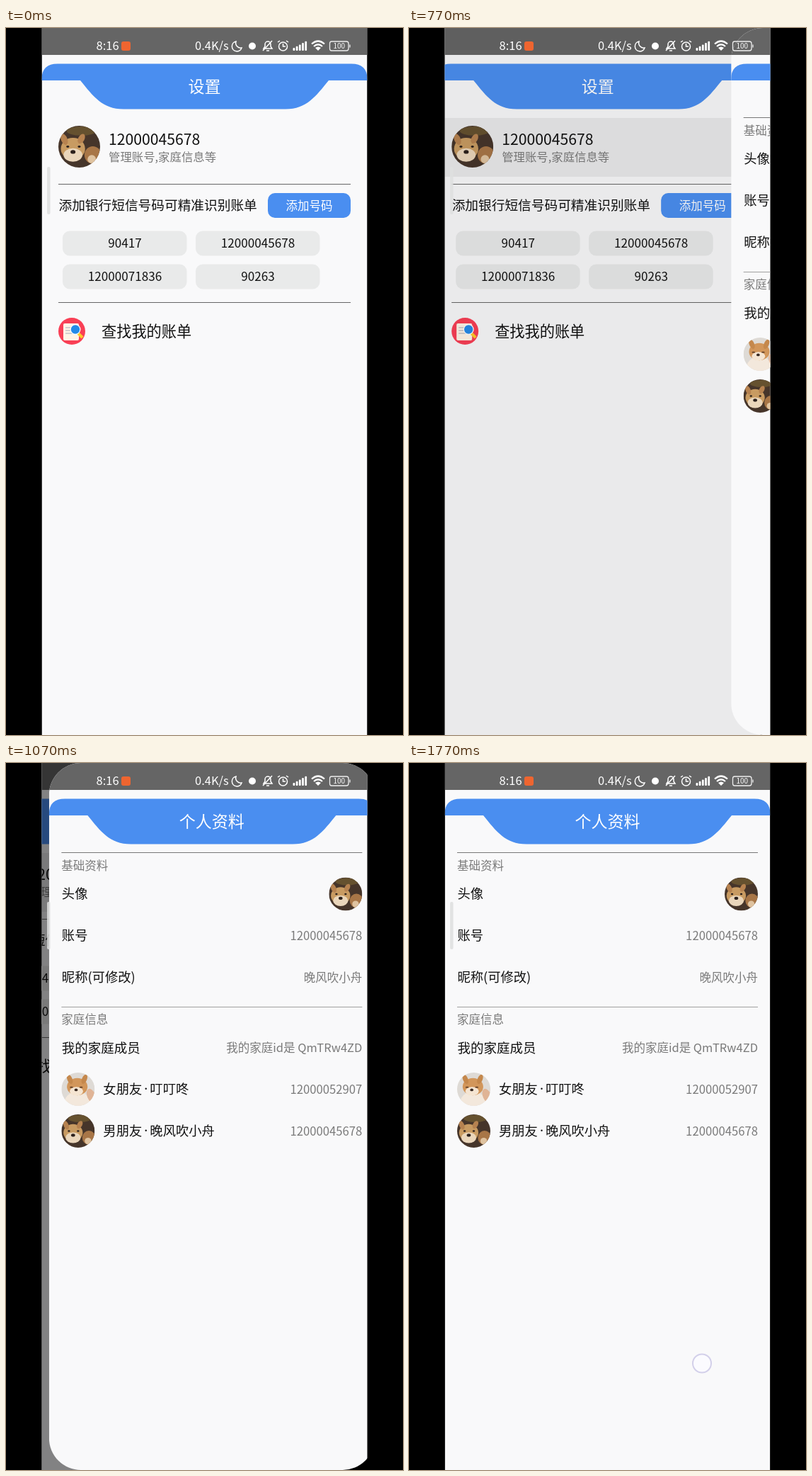
Animation, 561 px wide and 998 px high, one loop 1810 ms. Source, as an HTML page with a canvas:

```html
<!DOCTYPE html>
<html lang="zh-CN">
<head>
<meta charset="utf-8">
<style>
html, body { margin: 0; width: 100%; height: 100%; overflow: hidden; background: #000; }
canvas { display: block; }
</style>
</head>
<body>
<canvas id="stage" width="561" height="998"></canvas>
<script>
const c = document.getElementById('stage').getContext('2d');
const LOOP = 1810, LEFT = 50.5, WIDTH = 460, HEIGHT = 998;
const OPEN = 736, SETTLED = 1270, SPEED = 0.017;
const FONT = '"Noto Sans CJK SC", "Noto Sans CJK", "Noto Sans", sans-serif';
const BLUE = '#4a8ef0', PAPER = '#f9f9fa', GREY = '#7a7a7a';
const ACCOUNT = '12000045678', NICK = '晚风吹小舟';

const clamp = v => Math.max(0, Math.min(1, v));

function text(str, x, y, size, color = '#111', align = 'left', weight = 400) {
  c.font = `${weight} ${size}px ${FONT}`;
  c.fillStyle = color;
  c.textAlign = align;
  c.fillText(str, x, y + size * 0.37);
}

function box(x, y, w, h, r, color) {
  c.fillStyle = color;
  c.beginPath();
  c.roundRect(x, y, w, h, r);
  c.fill();
}

function oval(x, y, rx, ry, color, turn = 0) {
  c.fillStyle = color;
  c.beginPath();
  c.ellipse(x, y, rx, ry, turn, 0, 7);
  c.fill();
}

function stroke(d, color = '#fff', width = 1.5) {
  c.strokeStyle = color;
  c.lineWidth = width;
  c.stroke(new Path2D(d));
}

const rule = (x1, x2, y, color) => stroke(`M${x1} ${y}H${x2}`, color, 1);

function layer(draw) {
  c.save();
  draw();
  c.restore();
}

function avatar(x, y, r, bright) {
  layer(() => {
    c.translate(x, y);
    c.scale(r, r);
    c.beginPath();
    c.arc(0, 0, 1, 0, 7);
    c.clip();
    c.fillStyle = bright ? '#dedad5' : '#46352a';
    c.fillRect(-1, -1, 2, 2);
    if (bright) {
      oval(-0.05, 0.75, 0.75, 0.6, '#f3e8dc');
      oval(-0.05, -0.15, 0.62, 0.52, '#d2965a');
      oval(-0.5, -0.6, 0.15, 0.3, '#c5884c', -0.4);
      oval(0.38, -0.6, 0.15, 0.3, '#c5884c', 0.4);
      oval(-0.1, 0.12, 0.4, 0.26, '#f5e5d2');
      oval(-0.12, 0.04, 0.1, 0.08, '#3a2a22');
      oval(-0.4, -0.12, 0.1, 0.04, '#5b3a25');
      oval(0.18, -0.12, 0.1, 0.04, '#5b3a25');
      oval(0.8, 0.4, 0.25, 0.45, '#e0b496', -0.4);
    } else {
      oval(0.1, -0.75, 0.7, 0.22, '#65512f');
      oval(0.65, 0.4, 0.4, 0.42, '#a87647');
      oval(0.6, 0.6, 0.2, 0.2, '#dfc3a0');
      oval(-0.3, 0.1, 0.58, 0.52, '#c89b62');
      oval(-0.72, -0.35, 0.15, 0.28, '#b68250', -0.4);
      oval(0.1, -0.38, 0.15, 0.25, '#b68250', 0.5);
      oval(-0.3, 0.4, 0.45, 0.32, '#ead6bb');
      oval(-0.3, 0.25, 0.12, 0.09, '#2b201c');
      oval(-0.55, 0, 0.07, 0.05, '#2b201c');
      oval(0, 0, 0.07, 0.05, '#2b201c');
    }
  });
}

function pageBase(title) {
  c.fillStyle = PAPER;
  c.fillRect(LEFT, 0, WIDTH, HEIGHT);
  c.fillStyle = '#656565';
  c.fillRect(LEFT, 0, WIDTH, 38);
  c.fillStyle = BLUE;
  c.fill(new Path2D('M50.5 74V72Q50.5 50.5 73 50.5H488Q510.5 50.5 510.5 72V74H456C438 96 425 114.5 395 114.5H166C136 114.5 123 96 105 74Z'));
  text(title, 280.5, 82.5, 23, '#fff', 'center');
}

function settings(pressed) {
  pageBase('设置');
  if (pressed) box(LEFT, 127, WIDTH, 83, 0, 'rgba(0,0,0,.06)');
  avatar(103.5, 167.5, 29.5);
  text(ACCOUNT, 145, 157, 21.2);
  text('管理账号,家庭信息等', 145, 182, 16.4, GREY);
  rule(74, 487, 220.5, '#666');
  text('添加银行短信号码可精准识别账单', 74.5, 250.5, 18.7);
  box(370, 233, 117, 35, 10, BLUE);
  text('添加号码', 428.5, 250.5, 16.5, '#fff', 'center');
  ['90417', ACCOUNT, '12000071836', '90263'].forEach((number, i) => {
    const x = 80 + i % 2 * 188, y = 286.5 + (i >> 1) * 47;
    box(x, y, 175.5, 35, 10, '#e9eaea');
    text(number, x + 88, y + 17.5, 17.1, '#111', 'center');
  });
  rule(74, 487, 387.5, '#666');
  searchIcon();
  text('查找我的账单', 135, 428, 21.2);
}

function searchIcon() {
  oval(93, 428, 19, 19, '#f93f55');
  box(81, 417, 22, 24, 2, '#fff4e6');
  stroke('M84 423H92M84 427H92M84 431H95', '#a5a9b8', 1.2);
  stroke('M102 431L108 437', '#ffc928', 4);
  oval(98, 425.5, 7.5, 7.5, '#fff');
  oval(98, 425.5, 6.2, 6.2, '#258ae8');
}

function member(y, role, name, number, bright) {
  avatar(91.5, y, 23.5, bright);
  text(role, 127, y, 18.3);
  text('·', 187.5, y, 12, '#111', 'center');
  text(name, 193, y, 18.3);
  text(number, 493, y, 16.7, GREY, 'right');
}

function profile(toast) {
  pageBase('个人资料');
  rule(68, 493, 126.5, '#777');
  text('基础资料', 68, 144.5, 16.5, GREY);
  text('头像', 68.5, 184.5, 18.3);
  avatar(469.5, 185, 23.5);
  text('账号', 68.5, 243.5, 18.3);
  text(ACCOUNT, 493, 244, 16.7, GREY, 'right');
  text('昵称(可修改)', 68.5, 302.5, 18.3);
  text(NICK, 493, 302.5, 16.5, GREY, 'right');
  rule(68, 493, 344.5, '#a0a0a0');
  text('家庭信息', 68, 361.5, 16.5, GREY);
  text('我的家庭成员', 68.5, 402, 18.5);
  text('我的家庭id是 QmTRw4ZD', 493, 402, 16.5, GREY, 'right');
  member(460.5, '女朋友', '叮叮咚', '12000052907', true);
  member(519.5, '男朋友', NICK, ACCOUNT);
  if (toast > 0) layer(() => {
    c.globalAlpha = toast;
    box(204.5, 458.5, 152, 119, 6, 'rgba(0,0,0,.55)');
    text('加载中', 280.5, 550, 14, '#fff', 'center');
    c.translate(280.5, 499);
    for (let i = 0; i < 12; i++) {
      c.rotate(Math.PI / 6);
      stroke('M0 -9V-17', `rgba(220,220,220,${0.3 + i / 18})`, 2.5);
    }
  });
}

function statusIcons() {
  text('8:16', 127.5, 25, 16.5, '#fff');
  box(163, 19, 13, 13, 3, '#ee6530');
  text('0.4K/s', 267, 25, 16.5, '#fff');
  stroke('M325 19A7 7 0 1 0 333 28A7 7 0 0 1 325 19Z');
  oval(348, 25.5, 5, 5, '#fff');
  stroke('M364 29H376L374 26V23A4 4 0 0 0 366 23V26ZM368 32H372M376 18L363 32');
  stroke('M397.5 26A6 6 0 1 1 385.5 26A6 6 0 1 1 397.5 26M391.5 22V26H395M384 20L387 18M399 20L396 18');
  for (let i = 0; i < 5; i++) box(405.5 + i * 4.2, 28 - i * 2.3, 2.8, 4 + i * 2.3, 1, '#fff');
  stroke('M432 22.5Q441 14.5 450 22.5M435 26Q441 20.5 447 26', '#fff', 2.2);
  c.fillStyle = '#fff';
  c.fill(new Path2D('M437 28Q441 25 445 28L441 32Z'));
  stroke('M460 19H481Q484 19 484 22V29Q484 32 481 32H460Q457.5 32 457.5 29V22Q457.5 19 460 19ZM486 23.5V27.5', '#eee', 1.3);
  text('100', 470.8, 25.5, 10, '#fff', 'center', 500);
}

function touch(x, y, alpha) {
  if (alpha <= 0) return;
  layer(() => {
    c.globalAlpha = alpha;
    oval(x, y, 13, 13, '#fbfbff');
    c.strokeStyle = '#d3d0ea';
    c.lineWidth = 2;
    c.stroke();
  });
}

function render(t) {
  c.fillStyle = '#000';
  c.fillRect(0, 0, 561, HEIGHT);
  layer(() => {
    c.beginPath();
    c.rect(LEFT, 0, WIDTH, HEIGHT);
    c.clip();

    // Critically damped spring; the lower page follows at a quarter of the distance.
    const s = Math.max(0, t - OPEN) * SPEED;
    const rest = t < SETTLED ? (1 + s) * Math.exp(-s) : 0;
    const progress = 1 - rest;
    if (t < SETTLED) layer(() => {
      c.translate(-progress * WIDTH / 4, 0);
      settings(t > 690);
      box(LEFT, 0, WIDTH, HEIGHT, 0, `rgba(0,0,0,${progress * 0.49})`);
    });
    if (progress > 0) layer(() => {
      c.translate(rest * WIDTH, 0);
      c.beginPath();
      c.roundRect(LEFT, 0, WIDTH, HEIGHT, t < SETTLED ? 45 : 0);
      c.clip();
      profile(clamp((932 - t) / 80));
    });
    statusIcons();
    box(58, 196, 4.5, 67, 2, 'rgba(222,224,224,.85)');
    touch(419, 173.5, t >= 600 ? clamp((720 - t) / 40) : 0);
    touch(414, 847.5, t >= 1730 ? 1 : 0);
  });
}

function tick(now) {
  render(now % LOOP);
  requestAnimationFrame(tick);
}
requestAnimationFrame(tick);
</script>
</body>
</html>
```
